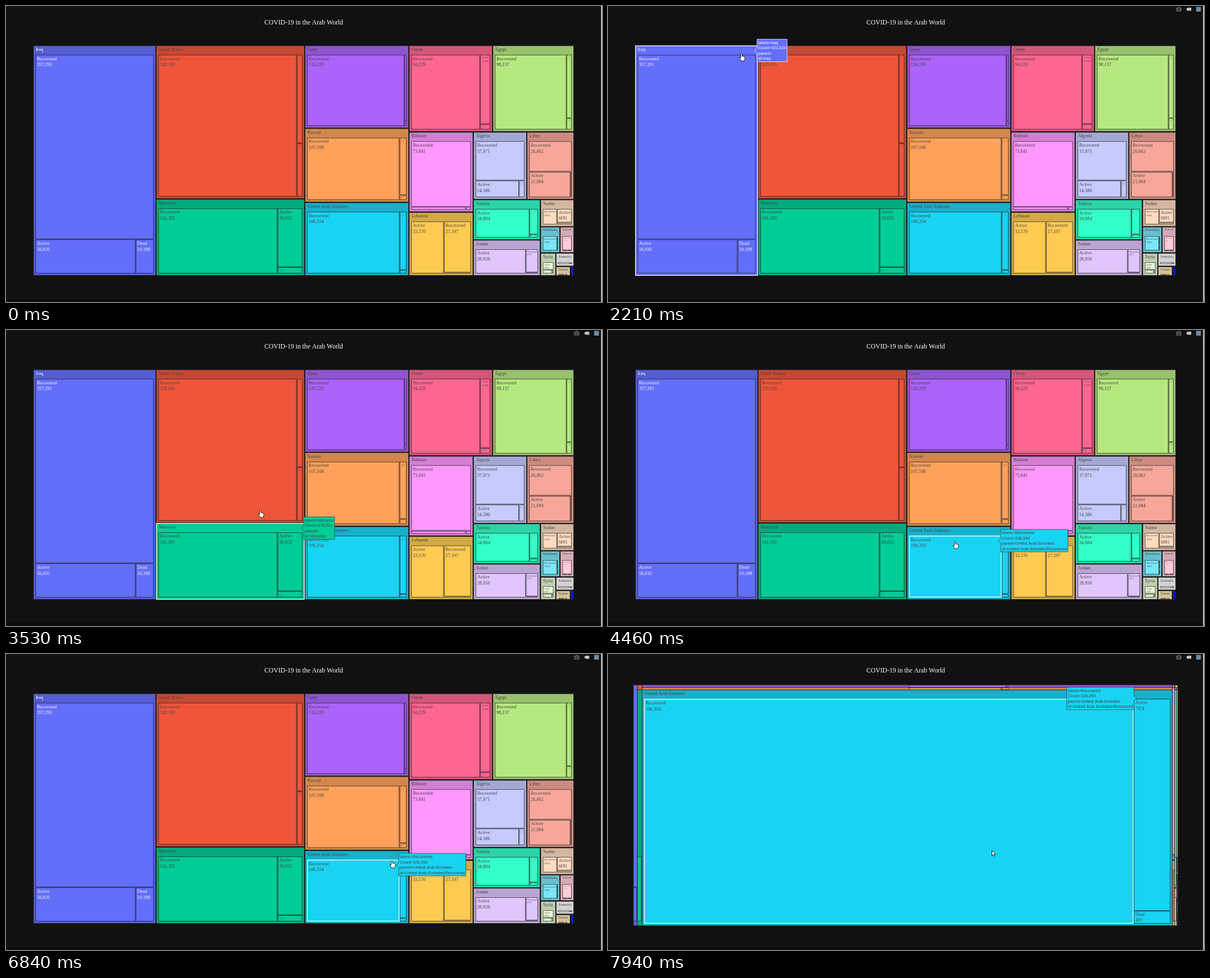
An HTML page with a canvas for the animation above (8 s loop, 1061 by 528 pixels).

```html
<!DOCTYPE html>
<html lang="en">
<head>
<meta charset="utf-8">
<title>COVID-19 in the Arab World</title>
<style>
html, body { margin: 0; width: 100%; height: 100%; overflow: hidden; background: #111; }
canvas { display: block; }
</style>
</head>
<body>
<canvas id="stage" width="1061" height="528"></canvas>
<script>
const ctx = document.getElementById('stage').getContext('2d');
const LOOP = 8000, FIRST = 130, STEP = 77.2;
const CLICK = 7300, ZOOM_START = 7348, ZOOM_TIME = 725;
const BG = '#111', INK = '#444', LINE = '#222';
const SERIF = '"Liberation Serif", "Times New Roman", serif';
const SANS = '"Liberation Sans", Arial, sans-serif';
const LABEL_SIZE = 8.3, TIP_SIZE = 7.25, GAP = 1.5;
const FULL = [45, 54.5, 1014.5, 484.5];
const STATES = ['Recovered', 'Active', 'Dead'];
const PALETTE = ['#636efa', '#ef553b', '#00cc96', '#ab63fa', '#ffa15a',
  '#19d3f3', '#ff6692', '#b6e880', '#ff97ff', '#fecb52'];

// Recovered, active, dead; largest country first.
const CASES = {
  'Iraq': [357291, 56035, 10198],
  'Saudi Arabia': [328165, 8423, 5087],
  'Morocco': [141381, 26652, 2878],
  'Qatar': [126218, 2700, 228],
  'Kuwait': [107108, 7600, 660],
  'United Arab Emirates': [106354, 7574, 459],
  'Oman': [94229, 12996, 1040],
  'Egypt': [98157, 1110, 6142],
  'Bahrain': [73841, 3100, 290],
  'Lebanon': [27197, 33570, 517],
  'Algeria': [37971, 14386, 1841],
  'Libya': [26062, 21084, 705],
  'Tunisia': [5032, 34884, 626],
  'Jordan': [6771, 28950, 345],
  'Sudan': [6764, 6091, 837],
  'Mauritania': [7392, 100, 163],
  'Djibouti': [5382, 67, 61],
  'Syria': [1500, 3520, 260],
  'Somalia': [3089, 470, 99],
  'Yemen': [1338, 115, 597],
  'Comoros': [494, 12, 7]
};

const format = n => n < 10000 ? String(n) : n.toLocaleString('en-US');
const sum = list => list.reduce((a, b) => a + b, 0);
const mix = (a, b, p) => a + (b - a) * p;
const mixRect = (a, b, p) => a.map((v, i) => mix(v, b[i], p));
const clamp = v => Math.max(0, Math.min(1, v));
const inside = ([x0, y0, x1, y1], x, y) => x >= x0 && x <= x1 && y >= y0 && y <= y1;
const easeInOut = p => p < 0.5 ? 4 * p ** 3 : 1 - 4 * (1 - p) ** 3;

function textWidth(text, size, family) {
  ctx.font = `${size}px ${family}`;
  return ctx.measureText(text).width;
}

function shiftLightness(hex, amount) {
  const [r, g, b] = [1, 3, 5].map(i => parseInt(hex.slice(i, i + 2), 16) / 255);
  const max = Math.max(r, g, b), min = Math.min(r, g, b), d = max - min, l = (max + min) / 2;
  const s = d / (1 - Math.abs(2 * l - 1));
  const h = max === r ? (g - b) / d : max === g ? (b - r) / d + 2 : (r - g) / d + 4;
  return `hsl(${h * 60}, ${s * 100}%, ${clamp(l + amount) * 100}%)`;
}

// The palette repeats lighter, then darker.
function colorOf(i) {
  const base = PALETTE[i % 10], turn = Math.floor(i / 10);
  return turn ? shiftLightness(base, turn === 1 ? 0.2 : -0.2) : base;
}

function inset([x0, y0, x1, y1], left, top, right, bottom) {
  const r = [x0 + left, y0 + top, x1 - right, y1 - bottom];
  if (r[0] > r[2]) r[0] = r[2] = (r[0] + r[2]) / 2;
  if (r[1] > r[3]) r[1] = r[3] = (r[1] + r[3]) / 2;
  return r;
}
const innerRect = rect => inset(rect, 4, 16.5, 4, 4);

// Squarified treemap: rows run along the shorter side while they get squarer.
function squarify(values, [x0, y0, x1, y1]) {
  if (!values.length) return [];
  const w = x1 - x0, h = y1 - y0, total = sum(values), wide = w >= h;
  const long = wide ? w : h, short = wide ? h : w;
  const worst = n => {
    const row = values.slice(0, n), depth = long * sum(row) / total;
    return Math.max(...row.map(v => {
      const side = short * v / sum(row);
      return Math.max(side / depth, depth / side);
    }));
  };
  let n = 1;
  while (n < values.length && worst(n + 1) <= worst(n)) n++;
  const row = values.slice(0, n), depth = long * sum(row) / total;
  let at = wide ? y0 : x0;
  const tiles = row.map(v => {
    const from = at;
    at += short * v / sum(row);
    return wide ? [x0, from, x0 + depth, at] : [from, y0, at, y0 + depth];
  });
  const rest = wide ? [x0 + depth, y0, x1, y1] : [x0, y0 + depth, x1, y1];
  return [...tiles, ...squarify(values.slice(n), rest)];
}

function layout(values, outer) {
  const half = GAP / 2, [x0, y0, x1, y1] = innerRect(outer);
  return squarify(values, [x0 - half, y0 - half, x1 + half, y1 + half])
    .map(r => inset(r, half, half, half, half));
}

function leafScale(leaf, [x0, y0, x1, y1]) {
  const w = Math.max(...[leaf.name, leaf.count].map(s => textWidth(s, LABEL_SIZE, SERIF)));
  return clamp(Math.min((x1 - x0 - 4) / w, (y1 - y0 - 3) / 20));
}

function makeLand(name, rect, i) {
  const color = colorOf(i), ink = i % 20 ? INK : '#fff';
  const sorted = CASES[name].map((n, j) => ({ n, state: STATES[j] })).sort((a, b) => b.n - a.n);
  const values = sorted.map(s => s.n), rects = layout(values, rect);
  const leaves = sorted.map(({ n, state }, j) => {
    const leaf = { name: state, count: format(n), parent: name, id: `${name}/${state}`, color, ink, rect: rects[j] };
    leaf.scale = leafScale(leaf, leaf.rect);
    return leaf;
  });
  const scale = clamp((rect[2] - rect[0] - 8) / textWidth(name, LABEL_SIZE, SERIF));
  return { name, id: name, parent: '', count: format(sum(values)), color, ink, rect, values, leaves, scale };
}

const names = Object.keys(CASES);
const tiles = layout(names.map(n => sum(CASES[n])), FULL);
const lands = names.map((n, i) => makeLand(n, tiles[i], i));
const focus = lands.find(l => l.name === 'United Arab Emirates');
const focusEnd = layout(focus.values, FULL);

// Cursor path: time, x, y of the fingertip.
const path = [
  [130, 883, 501], [750, 500, 352], [900, 430, 300], [1750, 218, 83], [2140, 218, 82],
  [2205, 233, 81], [2980, 610, 420], [3453, 456, 351], [3525, 452, 321], [3830, 583, 384],
  [3985, 587, 379], [4385, 587, 379], [4685, 723, 371], [5300, 749, 371], [5525, 747.5, 379],
  [6140, 800, 414], [6285, 810, 412], [6380, 810, 412], [6610, 712, 365], [6755, 688, 369],
  [7005, 685, 368], [7170, 685, 368], [7620, 677, 359], [7930, 683.5, 350.5]
];

function cursorAt(t) {
  const i = path.findIndex(k => k[0] > t);
  if (i <= 0) return path[i < 0 ? path.length - 1 : 0].slice(1);
  const [t0, x0, y0] = path[i - 1], [t1, x1, y1] = path[i];
  const p = (t - t0) / (t1 - t0);
  return [mix(x0, x1, p), mix(y0, y1, p)];
}

function hit(x, y) {
  const found = lands.find(l => inside(l.rect, x, y));
  return found && (found.leaves.find(l => inside(l.rect, x, y)) || found);
}

// Edges outside the focused tile go to the border, the others stay.
function pushOut(rect, p) {
  return rect.map((v, i) => {
    const a = i % 2, b = a + 2;
    if (v <= focus.rect[a] + 0.01) return mix(v, FULL[a], p);
    if (v >= focus.rect[b] - 0.01) return mix(v, FULL[b], p);
    return v;
  });
}

function outline([x0, y0, x1, y1], stroke, width) {
  ctx.strokeStyle = stroke;
  ctx.lineWidth = width;
  ctx.strokeRect(x0, y0, x1 - x0, y1 - y0);
}

function box(rect, fill, lit, alpha) {
  const [x0, y0, x1, y1] = rect;
  ctx.globalAlpha = alpha;
  ctx.fillStyle = fill;
  ctx.fillRect(x0, y0, x1 - x0, y1 - y0);
  ctx.globalAlpha = 1;
  outline(rect, lit ? '#fff' : LINE, lit ? 1.3 : 0.7);
}

function label(texts, x, y, scale, ink) {
  if (scale < 0.05) return;
  ctx.save();
  ctx.translate(x, y + 2);
  ctx.scale(scale, scale);
  ctx.font = `${LABEL_SIZE}px ${SERIF}`;
  ctx.fillStyle = ink;
  texts.forEach((s, i) => ctx.fillText(s, 0, 7 + i * 10.9));
  ctx.restore();
}

function drawLand(l, p, zoomed, hover) {
  const own = l === focus, showText = own || !zoomed;
  const rect = own ? mixRect(l.rect, FULL, p) : pushOut(l.rect, p);
  box(rect, l.color, hover === l, hover === l ? 1 : 0.82);
  if (showText) label([l.name], rect[0] + 4, rect[1] - 0.2, l.scale, l.ink);
  l.leaves.forEach((leaf, i) => {
    const r = own ? mixRect(leaf.rect, focusEnd[i], p) : pushOut(leaf.rect, p);
    box(r, leaf.color, hover === leaf, 1);
    const scale = own ? mix(leaf.scale, leafScale(leaf, focusEnd[i]), p) : leaf.scale;
    if (showText) label([leaf.name, leaf.count], r[0] + 2.2, r[1], scale, leaf.ink);
  });
}

function tooltip(item, rect, toLeft) {
  const texts = [`labels=${item.name}`, `Count=${item.count}`, `parent=${item.parent}`, `id=${item.id}`];
  const w = Math.max(...texts.map(s => textWidth(s, TIP_SIZE, SANS))) + 3.8;
  const cy = rect[1] + 8.3, top = cy - 20, bottom = cy + 20;
  const side = toLeft ? -1 : 1;
  const near = rect[2] - (toLeft ? 6.5 : 1), far = near + side * w;
  ctx.beginPath();
  ctx.moveTo(near - side * 4.4, cy);
  ctx.lineTo(near, cy - 4);
  ctx.lineTo(near, top);
  ctx.lineTo(far, top);
  ctx.lineTo(far, bottom);
  ctx.lineTo(near, bottom);
  ctx.lineTo(near, cy + 4);
  ctx.closePath();
  ctx.fillStyle = item.color;
  ctx.fill();
  ctx.strokeStyle = item.ink;
  ctx.lineWidth = 0.8;
  ctx.stroke();
  ctx.font = `${TIP_SIZE}px ${SANS}`;
  ctx.fillStyle = item.ink;
  texts.forEach((s, i) => ctx.fillText(s, Math.min(near, far) + 1.9, top + 8.4 + i * 9.5));
}

const hand = new Path2D('M-1.2 .8Q0-.6 1.2 .8V4.6Q2.2 4 3 5Q4.2 4.5 4.8 5.5Q6.2 5.3 6.2 7V9.3L4.5 12.8H-.6L-3.7 7.6Q-3.4 6.2-1.2 7.8Z');
const arrow = new Path2D('M0 0V9.2L2.1 7.3L3.5 10.4L5 9.7L3.6 6.7H6.5Z');

function cursor(shape, x, y) {
  ctx.save();
  ctx.translate(x, y);
  ctx.fillStyle = '#fff';
  ctx.strokeStyle = BG;
  ctx.lineWidth = 0.9;
  ctx.fill(shape);
  ctx.stroke(shape);
  ctx.restore();
}

function disc(x, y, r, fill) {
  ctx.fillStyle = fill;
  ctx.beginPath();
  ctx.arc(x, y, r, 0, 7);
  ctx.fill();
}

function modebar() {
  const grey = '#626262';
  ctx.fillStyle = grey;
  ctx.fillRect(1011.5, 3, 9, 6.8);
  ctx.fillRect(1014, 1.8, 4, 2);
  disc(1016, 6.3, 2.3, BG);
  disc(1016, 6.3, 1.3, grey);
  ctx.fillStyle = '#c6c6c6';
  ctx.fill(new Path2D('M1029 5.8L1032 3H1038.3V8.6H1032Z'));
  ctx.fillStyle = '#6f8aa3';
  ctx.fillRect(1047, 1.5, 8.5, 8.5);
}

function backdrop() {
  ctx.fillStyle = BG;
  ctx.fillRect(0, 0, 1061, 528);
  ctx.fillStyle = '#0b0b0b';
  ctx.fillRect(0, 523, 1061, 5);
  ctx.fillStyle = '#e4e4e4';
  ctx.fillRect(1059.5, 0, 1.5, 528);
  ctx.font = `11.7px ${SERIF}`;
  ctx.fillStyle = '#fff';
  ctx.textAlign = 'center';
  ctx.fillText('COVID-19 in the Arab World', 530, 33);
  ctx.textAlign = 'left';
}

function draw(time) {
  const step = Math.floor((time - FIRST) / STEP + 0.15);
  const t = FIRST + step * STEP;
  const active = step >= 0, zoomed = t >= CLICK;
  const p = easeInOut(clamp((t - ZOOM_START) / ZOOM_TIME));
  // The highlight trails the cursor by one step.
  const hover = !active ? null : zoomed ? focus.leaves[0] : hit(...cursorAt(t - STEP));

  backdrop();
  lands.forEach(l => { if (l !== hover) drawLand(l, p, zoomed, hover); });
  if (hover && !hover.parent) drawLand(hover, p, zoomed, hover);
  if (!active) return;
  if (hover) tooltip(hover, zoomed ? focusEnd[0] : hover.rect, zoomed);
  modebar();
  cursor(zoomed || !hover ? arrow : hand, ...cursorAt(t));
}

const start = performance.now();
function tick() {
  draw((performance.now() - start) % LOOP);
  requestAnimationFrame(tick);
}
tick();
</script>
</body>
</html>
```
